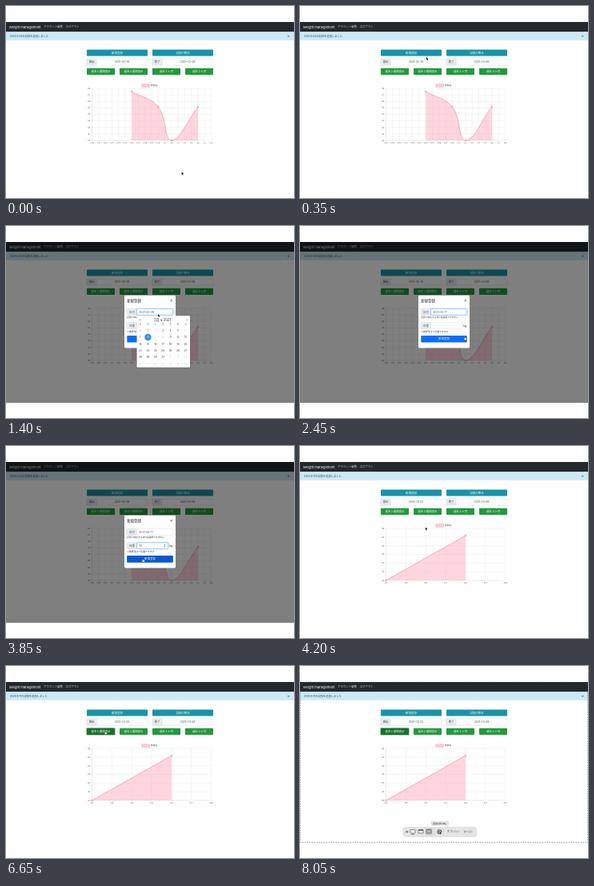
Animation of 360x240 px, one loop 8.4 s. Source, as an HTML page:

```html
<!DOCTYPE html>
<html lang="ja">
<head>
<meta charset="utf-8">
<title>Weight management</title>
<style>
html, body { margin: 0; width: 100%; height: 100%; overflow: hidden; background: #fff; }
svg { display: block; width: 100vw; height: 100vh; }
text { font-family: Inter, 'Noto Sans CJK JP', 'Noto Sans CJK', sans-serif; white-space: pre; }
</style>
</head>
<body>
<svg id="stage" viewBox="0 0 360 240"></svg>
<script>
const STEP = 350, LOOP = 8400;
const stage = document.getElementById('stage');

const rect = (x, y, w, h, fill, extra = '') =>
  `<rect x="${x}" y="${y}" width="${w}" height="${h}" fill="${fill}" ${extra}/>`;
const path = (d, stroke, width = .4, fill = 'none') =>
  `<path d="${d}" stroke="${stroke}" stroke-width="${width}" fill="${fill}"/>`;
// y is the vertical middle of the line
const text = (x, y, size, str, fill = '#212529', anchor = 'start', extra = '') =>
  `<text x="${x}" y="${y + size * .36}" font-size="${size}" fill="${fill}" text-anchor="${anchor}" ${extra}>${str}</text>`;
const mid = (x, y, size, str, fill, extra) => text(x, y, size, str, fill, 'middle', extra);
const group = (id, body) => `<g id="${id}">${body}</g>`;
const button = (x, y, w, label, fill, h = 8.2) =>
  rect(x, y, w, h, fill, 'rx=".8"') + mid(x + w / 2, y + h / 2, 3.45, label, '#fff');
const cross = (x, y, r, color, w = .6) =>
  path(`M${x - r} ${y - r}l${2 * r} ${2 * r}m0 ${-2 * r}l${-2 * r} ${2 * r}`, color, w);
const field = (x, y, w, label) =>
  rect(x, y, w, 8, '#fff', 'rx=".8" stroke="#ced4da" stroke-width=".4"') +
  rect(x, y, 12.2, 8, '#e9ecef', 'rx=".8" stroke="#ced4da" stroke-width=".4"') +
  mid(x + 6.1, y + 4, 3.45, label, '#495057');
const focusBox = (x, y, w) =>
  rect(x, y, w, 8, 'none', 'rx=".8" stroke="#bfdeff" stroke-width="1.4"') +
  rect(x, y, w, 8, 'none', 'rx=".8" stroke="#80bdff" stroke-width=".5"');

const LEFT = 107.5, RIGHT = 256.5, TOP = 103, BASE = 168;

function chart(id, labels, rows, line, points) {
  const dx = (RIGHT - LEFT) / (labels.length - 1), dy = (BASE - TOP) / rows;
  const size = labels.length > 10 ? 2.2 : 2.4;
  let s = '';
  labels.forEach((label, i) => {
    const x = LEFT + i * dx;
    s += path(`M${x} ${TOP}V${BASE + 1.8}`, i ? '#e6e6e6' : '#cfcfcf') + mid(x, 171.4, size, label, '#666');
  });
  for (let i = 0; i <= rows; i++) {
    const y = BASE - i * dy;
    s += path(`M${LEFT - 1.8} ${y}H${RIGHT}`, i ? '#e6e6e6' : '#cfcfcf') +
      text(105.2, y, 2.4, 60 + i, '#666', 'end');
  }
  const [first, last] = [points[0], points[points.length - 1]];
  const dots = points.map(([x, y]) =>
    `<circle cx="${x}" cy="${y}" r=".95" fill="#fbc4d0" stroke="#f0718c" stroke-width=".4"/>`).join('');
  s += group(id + 'Data',
    path(`${line}L${last[0]} ${BASE}H${first[0]}Z`, 'none', 0, 'rgba(255,150,175,.4)') +
    path(line, '#f2849b', .6) + dots);
  return group(id, s);
}

const days = (month, from, to) =>
  Array.from({ length: to - from + 1 }, (_, i) => `${month}/${from + i}`);

function calendar() {
  const x = i => 168 + 9.4 * i;
  let s = rect(163.3, 112.5, 67.2, 65, '#000', 'rx="1.4" opacity=".16"') +
    rect(163.5, 112.3, 66.6, 64.5, '#fff', 'rx="1.3"') +
    mid(195.5, 117.2, 4.3, '3月 <tspan font-size="2.4">▼</tspan> 2021', '#333') +
    path('M168.4 115.8l-1.4 1.4 1.4 1.4M225.2 115.8l1.4 1.4-1.4 1.4', '#444', .5);
  [...'日月火水木金土'].forEach((d, i) => s += mid(x(i), 123.4, 2.9, d, '#777'));
  const closed = [2, 6, 9, 10];
  for (let i = 0; i < 42; i++) {
    const n = i, cx = x(i % 7), cy = 130.6 + 8.4 * Math.floor(i / 7);
    const inside = n > 0 && n < 32;
    const picked = n === 8;
    if (picked) s += `<circle cx="${cx}" cy="${cy}" r="4.2" fill="#3c8ddd"/>`;
    if (n === 11) s += `<circle id="hover" cx="${cx}" cy="${cy}" r="4.2" fill="#e6e6e6"/>`;
    s += mid(cx, cy, 3.1, n === 0 ? 28 : n > 31 ? n - 31 : n,
      picked ? '#fff' : !inside || closed.includes(n) ? '#c4c4c4' : '#393939');
  }
  return group('calendar', s);
}

function page() {
  const teal = '#1894aa', green = '#219a3c';
  const p1 = LEFT + 82.78 + .02, p2 = 206.9;
  const curve = `M157.2 107C170.4 114.6 181.2 114.8 ${p1} 126C201.1 139.2 197.8 168 ${p2} 168C217.7 168 226.8 142.8 240 126`;
  return rect(0, 20, 360, 201, '#fff') +
    rect(0, 20, 360, 12.4, '#23282d') +
    text(3.7, 26.2, 4.1, 'Weight management', '#fff') +
    text(47, 26.2, 3.45, 'アカウント編集', '#d5d6d8') +
    text(75, 26.2, 3.3, 'ログアウト', '#d5d6d8') +
    rect(0, 32.4, 360, 10.4, '#cde9f5') +
    text(4.8, 37.6, 3.25, '', '#1c4f60', 'start', 'id="notice"') +
    cross(353.2, 37.7, 1.05, '#33505c') +
    button(101, 54.4, 76, '新規登録', teal) +
    button(183, 54.4, 76, '記録の修正', teal) +
    group('newFocus', rect(101, 54.4, 76, 8.2, 'none', 'rx=".8" stroke="#86c9d6" stroke-width="1.4"') +
      button(101, 54.4, 76, '新規登録', '#117a8b')) +
    field(101, 66.2, 76, '開始') + field(183, 66.2, 76, '終了') +
    mid(145, 70.2, 3.3, '', '#495057', 'id="start"') +
    mid(227, 70.2, 3.3, '2021-03-08', '#495057') +
    button(101, 77.8, 35, '過去１週間表示', green) +
    button(142, 77.8, 35, '過去２週間表示', green) +
    button(183, 77.8, 35, '過去１ヶ月', green) +
    button(224, 77.8, 35, '過去３ヶ月', green) +
    group('weekFocus', rect(101, 77.8, 35, 8.2, 'none', 'rx=".8" stroke="#8fcb9d" stroke-width="1.6"') +
      button(101, 77.8, 35, '過去１週間表示', '#1a7030')) +
    rect(170, 97.9, 9.4, 3.2, '#fbd3dc', 'stroke="#f2849b" stroke-width=".5"') +
    text(180.8, 99.5, 2.7, '体重kg', '#555') +
    chart('wide', [...days(2, 18, 28), ...days(3, 1, 8)], 8, curve,
      [[157.2, 107], [p1, 126], [p2, 168], [240, 126]]) +
    chart('week', days(3, 2, 8), 6, `M${LEFT} ${BASE}L${p2} 112`, [[LEFT, BASE], [p2, 112]]);
}

function modal() {
  return group('modal',
    rect(0, 20, 360, 201, '#000', 'opacity=".5"') +
    rect(148, 86.8, 64, 65.6, '#fff', 'rx="1.3"') +
    text(151.2, 93.2, 4.45, '新規登録', '#212529', 'start', 'font-weight="500"') +
    cross(206.8, 93.2, 1.1, '#333') +
    field(151.3, 103.4, 57.4, '日付') +
    group('dateFocus', focusBox(163.5, 103.4, 45.2)) +
    text(166.3, 107.4, 3.3, '', '#495057', 'start', 'id="date"') +
    text(151.2, 114.5, 2.75, '記録が存在する日付は選択できません', '#333') +
    field(151.3, 120.6, 51.4, '体重') +
    group('weightFocus', focusBox(163.5, 120.6, 39.2) +
      path('M197.5 124.1l.8-1 .8 1zM197.5 125.1l.8 1 .8-1z', '#555', .2, '#555')) +
    text(166.3, 124.6, 3.3, '', '#495057', 'start', 'id="weight"') +
    text(204.2, 124.8, 3.4, 'kg') +
    text(151.2, 131.6, 2.75, '小数第1位まで記載できます', '#333') +
    button(151.3, 137, 57.4, '新規登録', '#0b6dfb', 8.5) +
    group('sendHover', button(151.3, 137, 57.4, '新規登録', '#0a58cf', 8.5)) +
    calendar());
}

function recorder() {
  const icon = (x, fill) =>
    rect(x - 3, 204.6, 6, 4.4, fill, 'rx=".5" stroke="#444" stroke-width=".6"');
  return group('recorder',
    rect(.4, 20.4, 359.2, 200.2, 'none', 'stroke="#555" stroke-width=".6" stroke-dasharray="1.5 1.5"') +
    rect(164, 194.2, 21.5, 5, '#e4e4e4', 'rx=".5" stroke="#cfcfcf" stroke-width=".3"') +
    mid(174.7, 196.7, 2.5, '画面収録を停止', '#333') +
    rect(129, 201.5, 91.5, 12, '#e4e4e4', 'rx="2.4" stroke="#cdcdcd" stroke-width=".4"') +
    `<circle cx="133.6" cy="207.3" r="1.4" fill="#777"/>` + cross(133.6, 207.3, .5, '#eee', .35) +
    rect(156.8, 202.8, 8.6, 8.6, '#c4c4c4', 'rx="1"') +
    icon(141, '#f4f4f4') + path('M139 210.3h4', '#444', .6) +
    icon(151, '#f4f4f4') + path('M148 205.3h6', '#444', 1) +
    icon(161, '#b9b9b9') +
    path('M168 203.5v8', '#c6c6c6') +
    `<circle cx="174.3" cy="207.3" r="2.5" fill="#eee" stroke="#333" stroke-width="1"/>` +
    rect(173.3, 206.3, 2, 2, '#333') +
    text(183.8, 207.3, 3.1, 'オプション', '#444') +
    text(204.8, 207.3, 2.8, '取り込む', '#555'));
}

const cursors =
  group('arrow', path('M0 0v3.3l.8-.7.6 1.3.6-.3-.6-1.2h1.1z', '#fff', .7, '#fff') +
    path('M0 0v3.3l.8-.7.6 1.3.6-.3-.6-1.2h1.1z', 'none', 0, '#000')) +
  group('hand', path('M-.4 0q.4-.4.8 0v1.3l1.6.4q.5.2.4.8l-.4 1.5h-2.3l-1.3-1.8q.1-.6.6-.3l.6.5z', '#222', .35, '#fff'));

stage.innerHTML = page() + modal() + recorder() + cursors;

const el = Object.fromEntries([...stage.querySelectorAll('[id]')].map(n => [n.id, n]));
const show = (id, on) => el[id].style.display = on ? '' : 'none';

// [first step, x, y, shape]
const moves = [
  [0, 219.6, 207.6, 'arrow'], [1, 158, 64, 'arrow'], [2, 155, 60.5, 'hand'],
  [3, 180, 109, 'arrow'], [4, 190, 110, 'arrow'], [5, 206, 138.5, 'hand'],
  [8, 188, 125, 'arrow'], [10, 176, 134, 'arrow'], [11, 171, 141, 'hand'],
  [12, 156.8, 101.6, 'arrow'], [13, 141, 93, 'arrow'], [14, 127, 84, 'hand'],
  [16, 124, 81.5, 'hand'], [23, 174.6, 206.8, 'arrow']
];

function draw(step) {
  const saved = step >= 12, within = (a, b) => step >= a && step < b;
  el.notice.textContent = `2021/${saved ? '3/11' : '2/24'}の記録を追加しました`;
  el.start.textContent = saved ? '2021-03-02' : '2021-02-18';
  el.date.textContent = step < 7 ? '2021-03-08' : '2021-03-11';
  el.weight.textContent = step < 9 ? '' : step < 10 ? '7' : '70';
  show('wide', !saved);
  show('week', saved);
  show('modal', within(2, 12));
  show('newFocus', step === 2);
  show('dateFocus', within(4, 8));
  show('calendar', within(4, 7));
  show('hover', within(5, 7));
  show('weightFocus', within(8, 12));
  show('sendHover', step === 11);
  show('weekFocus', step >= 16);
  show('recorder', step === 23);
  const k = step === 17 ? .8 : 1;
  el.weekData.setAttribute('transform', `translate(0 ${BASE * (1 - k)}) scale(1 ${k})`);
  const [, x, y, shape] = moves.filter(m => m[0] <= step).pop();
  for (const id of ['arrow', 'hand']) show(id, id === shape);
  el[shape].setAttribute('transform', `translate(${x} ${y})`);
}

const begin = performance.now();
let last = -1;
function tick() {
  const step = Math.floor((performance.now() - begin) % LOOP / STEP);
  if (step !== last) draw(last = step);
  requestAnimationFrame(tick);
}
tick();
</script>
</body>
</html>
```
